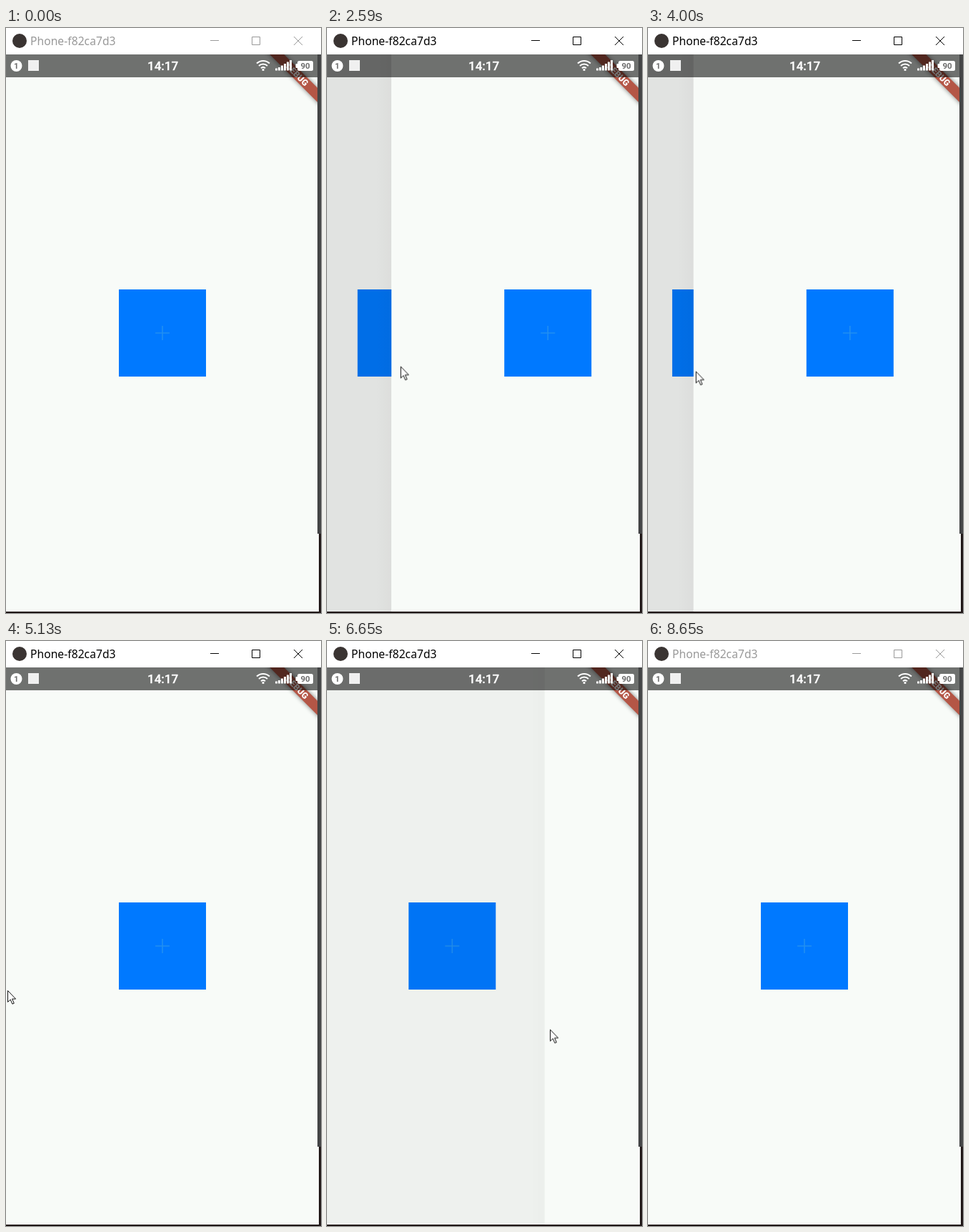
These frames come from a looping animation (441x819 px, 8.72 s). An HTML page:

```html
<!DOCTYPE html>
<html lang="en">
<head>
<meta charset="utf-8">
<title>Swipe back</title>
<style>
@property --x { syntax: "<number>"; inherits: true; initial-value: 436; }

html, body { margin: 0; width: 100%; height: 100%; overflow: hidden; background: #fff; }
svg { display: block; }
.stage { width: 441px; height: 819px; }

/* --x is the left edge of the upper page; everything else follows from it */
.phone { animation: slide 8720ms linear infinite; }
.upper { transform: translateX(calc(var(--x) * 1px)); }
.lower { transform: translateX(calc((var(--x) - 436) / 3 * 1px)); }
.shade {
  transform: translateX(calc(var(--x) * 1px));
  opacity: min(1, calc((436 - var(--x)) / 436 * 1.45));
}
.window { color: #999; animation: focus 8720ms step-end infinite; }
.cursor { animation: point 8720ms linear infinite; }

.title { font: 15.7px "Noto Sans", "Open Sans", sans-serif; fill: currentColor; }
.buttons { fill: none; stroke: currentColor; }
.clock { font: 500 17px Roboto, sans-serif; }
.small { font: 700 11.5px Roboto, sans-serif; fill: #6d6d6d; text-anchor: middle; }
.banner { font: 900 12px Roboto, sans-serif; text-anchor: middle; }

@keyframes focus {
  0%, 99.1% { color: #999; }
  13.1% { color: #000; }
}
@keyframes slide {
  0% { --x: 436; }
  14.22% { --x: 436; animation-timing-function: cubic-bezier(.35, .91, .33, .97); }
  18.81% { --x: 0; }
  25.8% { --x: 0; animation-timing-function: ease-in; }
  32.68% { --x: 230; animation-timing-function: ease-out; }
  37.27% { --x: 300; animation-timing-function: ease-in; }
  41.28% { --x: 177; animation-timing-function: ease-out; }
  45.3% { --x: 60; animation-timing-function: ease-in-out; }
  50.46% { --x: 210; animation-timing-function: ease-in; }
  55.05% { --x: 110; animation-timing-function: ease-out; }
  58.26%, 67.43% { --x: 0; }
  70.18% { --x: 180; }
  74.77% { --x: 285; animation-timing-function: ease-out; }
  78.56% { --x: 320; }
  80.16% { --x: 391; animation-timing-function: ease-out; }
  83.14%, 100% { --x: 436; }
}
@keyframes point {
  0%, 1.2% { transform: translate(300px, 830px); animation-timing-function: ease-out; }
  10.3% { transform: translate(220px, 437px); }
  20% { transform: translate(220px, 437px); animation-timing-function: ease-in-out; }
  24.5% { transform: translate(2px, 470px); }
  25.5% { transform: translate(2px, 470px); animation-timing-function: ease-in; }
  32.4% { transform: translate(230px, 478px); animation-timing-function: ease-out; }
  37% { transform: translate(300px, 470px); animation-timing-function: ease-in; }
  41.28% { transform: translate(173px, 472px); animation-timing-function: ease-out; }
  45% { transform: translate(58px, 480px); animation-timing-function: ease-in-out; }
  50.2% { transform: translate(208px, 488px); animation-timing-function: ease-in; }
  54.8% { transform: translate(108px, 490px); animation-timing-function: ease-out; }
  58%, 65.9% { transform: translate(2px, 489px); }
  67.09% { transform: translate(65px, 486px); }
  69.9% { transform: translate(184px, 496px); }
  74.5% { transform: translate(290px, 530px); animation-timing-function: ease-out; }
  78.3% { transform: translate(324px, 551px); }
  87% { transform: translate(324px, 551px); animation-timing-function: ease-in; }
  95.5%, 100% { transform: translate(345px, 835px); }
}
</style>
</head>
<body>
<svg class="stage" viewBox="0 0 441 819">
  <defs>
    <linearGradient id="edge">
      <stop offset="0" stop-color="#280014" stop-opacity="0"/>
      <stop offset="1" stop-color="#280014" stop-opacity=".025"/>
    </linearGradient>
    <filter id="soft" x="-20%" y="-80%" width="140%" height="260%">
      <feGaussianBlur stdDeviation="3"/>
    </filter>
    <g id="page">
      <rect width="436" height="780" fill="#f8fbf8"/>
      <rect x="158" y="329" width="122" height="122" fill="#0079ff"/>
      <path d="M209 390h20M219 380v20" stroke="#218ff2" stroke-width="1.6"/>
    </g>
  </defs>

  <!-- Desktop behind the window -->
  <rect width="441" height="819" fill="#211818"/>
  <rect x="436" y="37" width="5" height="671" fill="#444546"/>
  <rect y="708" width="438" height="109" fill="#f8fbf8"/>

  <!-- Title bar -->
  <g class="window">
    <rect width="441" height="37" fill="#fff"/>
    <circle cx="19" cy="18" r="10" fill="#3a3432"/>
    <text class="title" x="34" y="24">Phone-f82ca7d3</text>
    <path class="buttons" d="M286 17.5h12M344.5 12.5h11v11h-11zM403 12l12 12M415 12l-12 12"/>
  </g>

  <!-- Phone screen -->
  <svg class="phone" y="37" width="436" height="780">
    <use class="lower" href="#page"/>
    <g class="shade">
      <rect x="-436" width="436" height="780" fill="#000" fill-opacity=".094"/>
      <rect x="-22" width="22" height="780" fill="url(#edge)"/>
    </g>
    <use class="upper" href="#page"/>

    <g class="banner" transform="translate(436) rotate(45)">
      <rect x="-56" y="33" width="112" height="14.2" opacity=".5" filter="url(#soft)"/>
      <rect x="-56" y="33" width="112" height="14.2" fill="#b45646"/>
      <text y="44.4" fill="#fff">DEBUG</text>
    </g>

    <!-- Status bar -->
    <rect width="436" height="32" fill-opacity=".55"/>
    <g fill="#fff">
      <circle cx="14.5" cy="16" r="8"/>
      <text class="small" x="14.3" y="20.2">1</text>
      <rect x="31" y="8" width="15" height="15" fill="#f0f0f0"/>
      <text class="clock" x="198" y="22.2" stroke="#fff" stroke-width=".3">14:17</text>
      <g fill="none" stroke="#fff" stroke-width="2">
        <path d="M351 12.5a13 13 0 0 1 18 0M354 16a8.5 8.5 0 0 1 12 0M357 19.2a4.5 4.5 0 0 1 6 0"/>
      </g>
      <circle cx="360" cy="21.5" r="1.6"/>
      <path d="M377 19.5h3v3h-3zM381 18h3v4.500h-3zM385 15.500h3v7h-3zM389 13h3v9.500h-3zM393 10.500h3v12h-3zM397 8h3v14.500h-3z"/>
      <rect x="405.500" y="13" width="3" height="6" rx="1"/>
      <rect x="408" y="9" width="22" height="14" rx="2.500"/>
      <text class="small" x="419" y="20.200">90</text>
    </g>
  </svg>

  <path class="cursor" d="M.5 .5v16l3.700-3.500 2.700 6.200 2.400-1-2.700-6.100h5z"
        fill="#fff" stroke="#111" stroke-width="1"/>
</svg>
</body>
</html>
```
